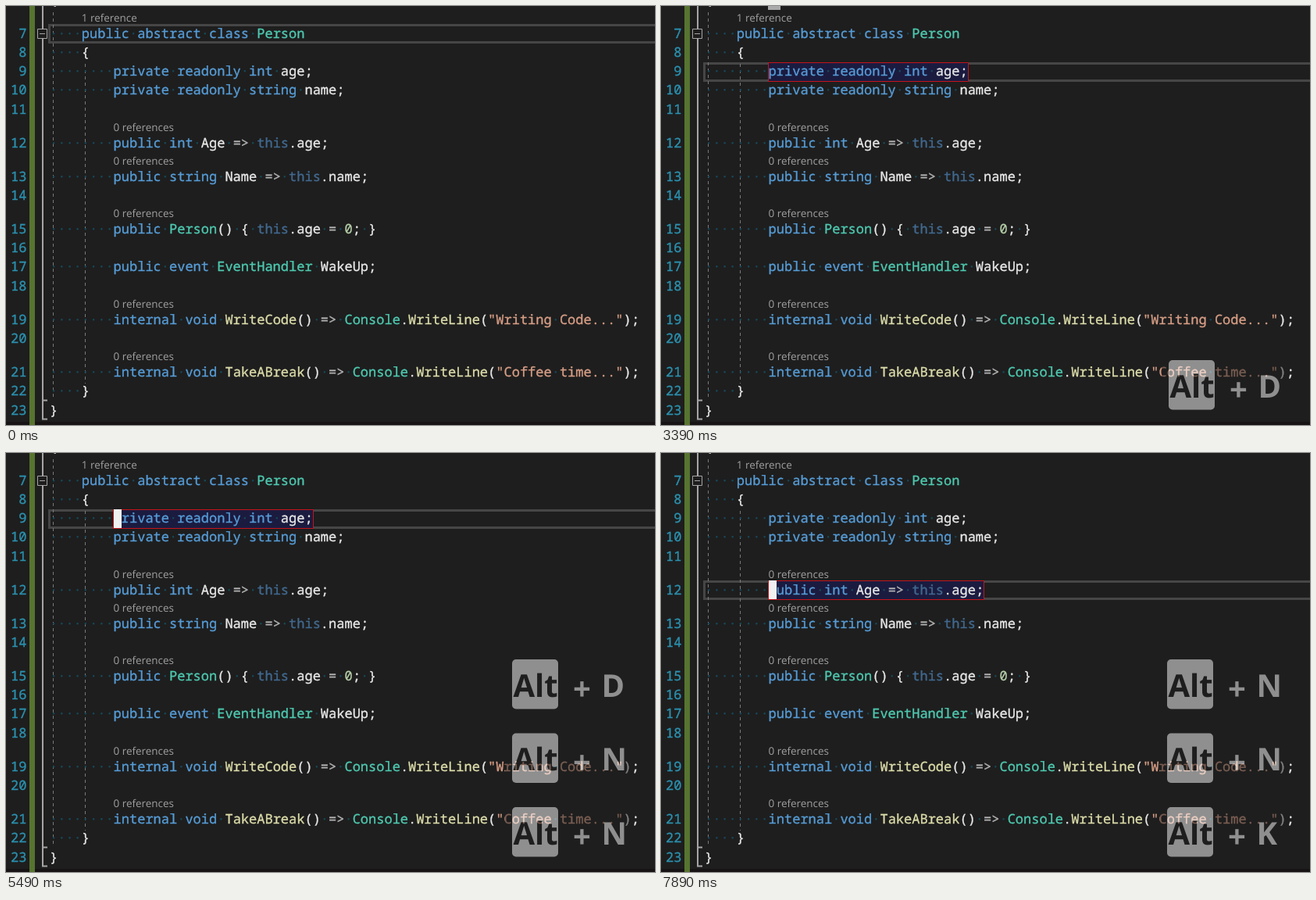
Recreate the animation shown at these times as an HTML page. Size 831 by 536 pixels, loop 8000 ms.

```html
<!DOCTYPE html>
<html lang="en">
<head>
<meta charset="utf-8">
<title>Jumping between class members</title>
<style>
  html, body { margin: 0; width: 100%; height: 100%; overflow: hidden; background: #1e1e1e; }
  svg { display: block; text-rendering: geometricPrecision; }
  .code { font: 17px "Noto Sans Mono", "DejaVu Sans Mono", monospace; stroke-width: .35px; }
  .lens { font: 13.45px "Open Sans", "Noto Sans", sans-serif; fill: #a0a0a0; }
  .keys { font: bold 40px "Open Sans", "Noto Sans", sans-serif; fill: #fff; }
</style>
</head>
<body>
<svg width="831" height="536" viewBox="0 0 831 536">
  <rect width="831" height="536" fill="#1e1e1e"/>
  <rect y="532" width="831" height="4" fill="#181314"/>
  <rect x="30" width="7" height="536" fill="#577430"/>
  <rect id="row" x="55.5" width="800" height="22" fill="none" stroke="#464646" stroke-width="3"/>
  <rect id="mark" x="137.5" height="24" fill="#1b1b40" stroke="#c4141b"/>
  <path d="M60.5 8V500M101.5 74V483" stroke="#7a7a7a" stroke-dasharray="4 4"/>
  <path d="M47 0V528.5H53M47 504.5H53" fill="none" stroke="#a5a5a5" stroke-width="2"/>
  <path d="M40.5 29.5h12v12h-12zM43 35.5h7" fill="#1e1e1e" stroke="#a5a5a5"/>
  <g id="text"></g>
  <rect id="block" x="137" width="16" height="5" fill="#aaa"/>
  <rect id="caret" width="10" height="24" fill="#f0f0f0"/>
  <g id="keys" class="keys"></g>
</svg>
<script>
const LOOP = 8000, LEFT = 56, CELL = 10.2;
const $ = id => document.getElementById(id);
const colX = col => LEFT + col * CELL;

// line number, text centre, indent, code, reference count label
const lines = [
  ['', -8, 0, '{'],
  [7, 35, 4, 'public abstract class Person', '1 reference'],
  [8, 59, 4, '{'],
  [9, 83, 8, 'private readonly int age;'],
  [10, 107, 8, 'private readonly string name;'],
  [11, 132, 0, ''],
  [12, 175, 8, 'public int Age => this.age;', '0 references'],
  [13, 218, 8, 'public string Name => this.name;', '0 references'],
  [14, 242, 0, ''],
  [15, 285, 8, 'public Person() { this.age = 0; }', '0 references'],
  [16, 309, 0, ''],
  [17, 333, 8, 'public event EventHandler WakeUp;'],
  [18, 358, 0, ''],
  [19, 401, 8, 'internal void WriteCode() => Console.WriteLine("Writing Code...");', '0 references'],
  [20, 425, 0, ''],
  [21, 468, 8, 'internal void TakeABreak() => Console.WriteLine("Coffee time...");', '0 references'],
  [22, 492, 4, '}'],
  [23, 517, 0, '}'],
];

const palette = [
  [/^"/, '#d69d85'],
  [/^this$/, '#41698f'],
  [/^(public|private|internal|abstract|class|readonly|int|string|event|void)$/, '#569cd6'],
  [/^(Person|EventHandler|Console)$/, '#4ec9b0'],
  [/^(WriteCode|TakeABreak|WriteLine)$/, '#dcdcaa'],
  [/^\d/, '#b5cea8'],
  [/^=/, '#b4b4b4'],
  [/./, '#e8e8e8'],
];
const ink = color => `fill="${color}" stroke="${color}"`;
const span = (s, color) => `<tspan ${ink(color)}>${s}</tspan>`;
const dots = s => s.replace(/ /g, '·');

function paint(code) {
  return code.match(/"[^"]*"|\w+|=>| +|./g).map(token => {
    const color = palette.find(([re]) => re.test(token))[1];
    return token.split(/( +)/).filter(Boolean)
      .map(s => s[0] === ' ' ? span(dots(s), '#17495a') : span(s.replace('>', '&gt;'), color)).join('');
  }).join('');
}

$('text').innerHTML = lines.map(([num, y, indent, code, lens]) => {
  let out = `<text class="code" x="26.5" y="${y + 6}" text-anchor="end" ${ink('#2b91af')}>${num}</text>`;
  if (code) out += `<text class="code" x="${LEFT}" y="${y + 6}">${paint(' '.repeat(indent) + code)}</text>`;
  if (lens) out += `<text class="lens" x="${colX(indent)}" y="${y - 15}">${lens}</text>`;
  return out;
}).join('');

// selected row over time; the caret toggles at each blink time
const scenes = [
  { at: 0, top: 23, col: 12, chars: 0, keys: '', blinks: [250, 810, 1340] },
  { at: 1880, top: 72, col: 8, chars: 25, keys: 'D', blinks: [2300, 2820, 3390] },
  { at: 3690, top: 96, col: 8, chars: 29, keys: 'DN', blinks: [4210, 4710, 5210] },
  { at: 5490, top: 72, col: 8, chars: 25, keys: 'DNN', blinks: [6020, 6440] },
  { at: 6840, top: 163, col: 8, chars: 27, keys: 'NNK', blinks: [7330, 7890] },
];

function keyRow(letter, i, all) {
  const x = all.length === 1 ? 650 : 648;
  const y = 453 - 94.5 * (all.length - 1 - i);
  return `<g transform="translate(${x} ${y})" opacity=".5">
    <rect x="-9" width="161" height="66" fill="#1e1e1e"/>
    <rect width="59" height="63.5" rx="5"/>
    <text x="1.5" y="47.5" fill="#1e1e1e">Alt</text>
    <text x="78" y="51.5">+</text>
    <text x="114.5" y="47.5">${letter}</text></g>`;
}

function set(el, attrs) {
  for (const name in attrs) el.setAttribute(name, attrs[name]);
}
const show = (el, on) => set(el, { visibility: on ? 'visible' : 'hidden' });

let current;
function enter(scene) {
  current = scene;
  set($('row'), { y: scene.top + 1.5 });
  set($('mark'), { y: scene.top + .5, width: Math.round(scene.chars * CELL + 1) });
  show($('mark'), scene.chars);
  set($('caret'), { x: Math.round(colX(scene.col)), y: scene.top });
  $('keys').innerHTML = [...scene.keys].map(keyRow).join('');
}

function frame(now) {
  const t = now % LOOP;
  const scene = scenes.findLast(s => t >= s.at);
  if (scene !== current) enter(scene);
  const toggles = scene.blinks.filter(b => t >= b).length + (scene.at > 0);
  show($('caret'), toggles % 2);
  show($('block'), (t >= 810 && t < 1880) || (t >= 3390 && t < 3690));
}

const start = performance.now();
function tick() {
  frame(performance.now() - start);
  requestAnimationFrame(tick);
}
tick();
</script>
</body>
</html>
```
